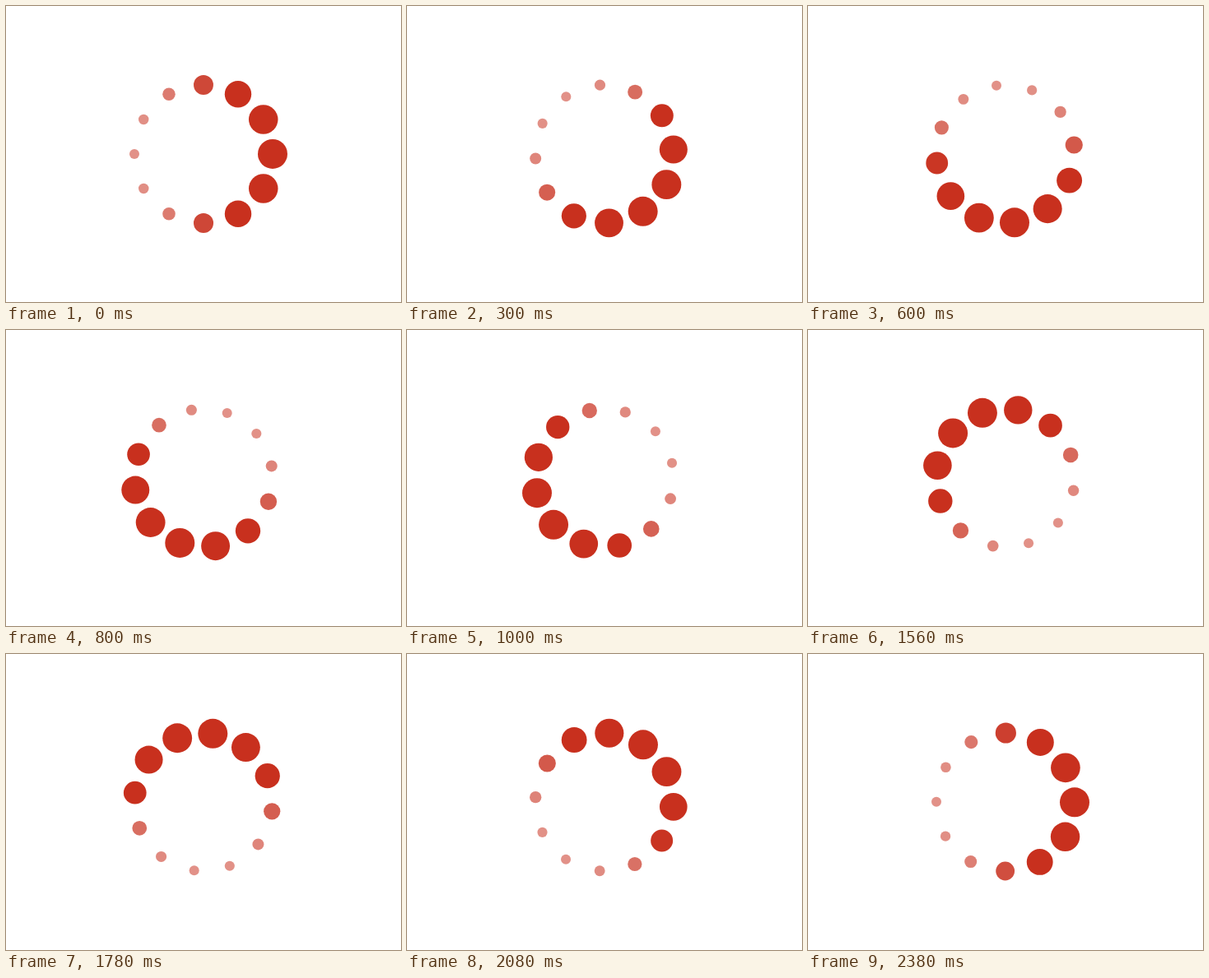
Write an HTML page with a canvas that moves like this. It is 480 by 360 pixels and loops after 2400 ms.

```html
<!DOCTYPE html>
<html lang="en">
<head>
<meta charset="utf-8">
<title>Loading ring</title>
<style>
  html, body { margin: 0; width: 100%; height: 100%; overflow: hidden; background: #fff; }
  canvas { display: block; }
</style>
</head>
<body>
<canvas id="stage" width="480" height="360"></canvas>
<script>
const ctx = document.getElementById('stage').getContext('2d');
const LOOP = 2400, DOTS = 12, RING = 84;
const TURN = Math.PI * 2, STEP = TURN / DOTS;
const SMALL = 6, LARGE = 18;

const easeInOutCubic = x => x < 0.5 ? 4 * x ** 3 : 1 - 4 * (1 - x) ** 3;

// 1 at the crest of the wave, 0 on the opposite side of the ring
function closeness(angle, crest) {
  const gap = Math.abs(Math.atan2(Math.sin(angle - crest), Math.cos(angle - crest)));
  return 1 - gap / Math.PI;
}

function draw(ms) {
  const p = (ms % LOOP) / LOOP;
  ctx.globalAlpha = 1;
  ctx.fillStyle = '#fff';
  ctx.fillRect(0, 0, 480, 360);
  ctx.fillStyle = '#c8301e';
  // The crest makes a full turn while the dots drift back by one place.
  for (let i = 0; i < DOTS; i++) {
    const angle = (i - p) * STEP;
    const swell = easeInOutCubic(closeness(angle, p * TURN));
    ctx.globalAlpha = Math.min(1, 0.53 + 0.72 * swell);
    ctx.beginPath();
    ctx.arc(240 + RING * Math.cos(angle), 180 + RING * Math.sin(angle),
      SMALL + (LARGE - SMALL) * swell, 0, TURN);
    ctx.fill();
  }
}

const start = performance.now();
function tick() {
  draw(performance.now() - start);
  requestAnimationFrame(tick);
}
tick();
</script>
</body>
</html>
```
